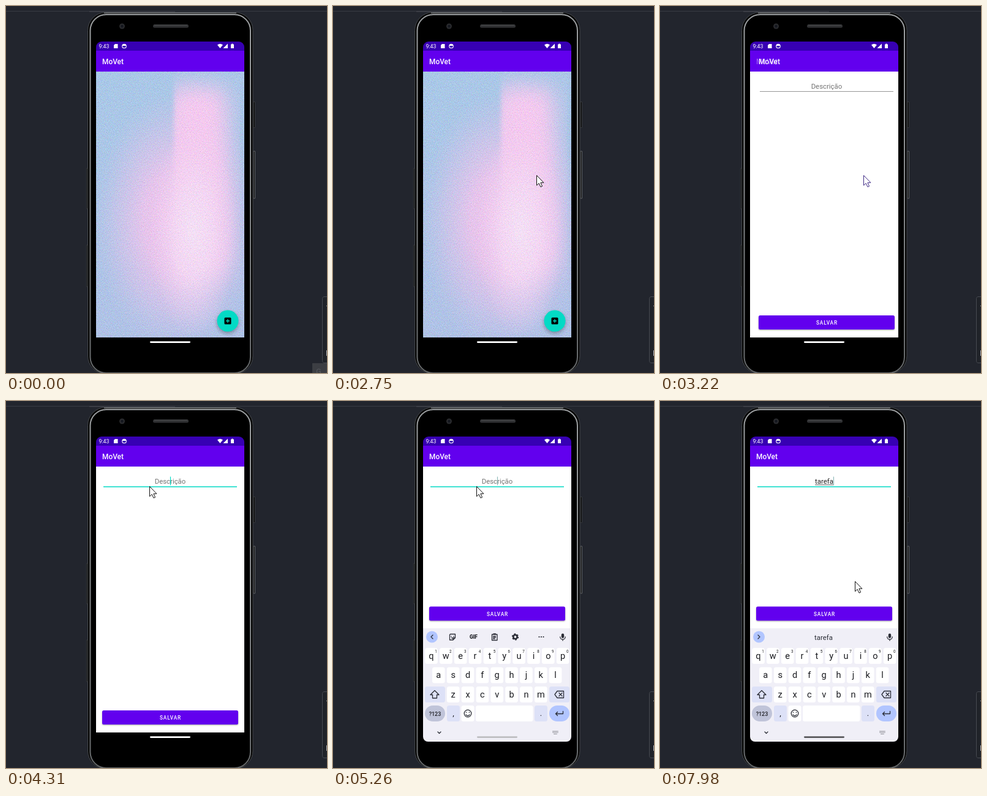
An HTML page for the animation above (8 s loop, 524 by 599 pixels).

```html
<!DOCTYPE html>
<html lang="pt">
<head>
<meta charset="utf-8">
<title>Notas</title>
<style>
html, body { margin: 0; width: 100%; height: 100%; overflow: hidden; background: #22252d; }
svg { display: block; width: 524px; height: 599px; }
text { font-family: Roboto, sans-serif; white-space: pre; }
.mid { text-anchor: middle; }
.ink { fill: none; stroke: #2b2d36; stroke-width: 1.3; stroke-linecap: round; stroke-linejoin: round; }
</style>
</head>
<body>
<svg viewBox="0 0 524 599">
  <defs>
    <linearGradient id="sky" x2=".25" y2="1">
      <stop offset="0" stop-color="#a9c8e7"/><stop offset="1" stop-color="#b0c2e6"/>
    </linearGradient>
    <linearGradient id="rim" x2="0" y2="1">
      <stop offset="0" stop-color="#9da0a2"/><stop offset=".5" stop-color="#85888a"/><stop offset="1" stop-color="#65686a"/>
    </linearGradient>
    <radialGradient id="glow">
      <stop offset="0" stop-color="#f2c6ee"/><stop offset=".4" stop-color="#efc4ec" stop-opacity=".85"/>
      <stop offset=".7" stop-color="#e0c4eb" stop-opacity=".5"/>
      <stop offset="1" stop-color="#cfc4ea" stop-opacity="0"/>
    </radialGradient>
    <radialGradient id="pale">
      <stop offset="0" stop-color="#f4e0f6"/><stop offset=".45" stop-color="#f3dbf5" stop-opacity=".7"/>
      <stop offset="1" stop-color="#f1d0f0" stop-opacity="0"/>
    </radialGradient>
    <filter id="b1" x="-30%" y="-30%" width="160%" height="160%"><feGaussianBlur stdDeviation="1.3"/></filter>
    <filter id="b3" x="-20%" y="-20%" width="140%" height="140%"><feGaussianBlur stdDeviation="3"/></filter>
    <filter id="b17" x="-70%" y="-30%" width="240%" height="160%"><feGaussianBlur stdDeviation="17"/></filter>
    <filter id="grain" filterUnits="userSpaceOnUse" x="147" y="107" width="242" height="434" color-interpolation-filters="sRGB">
      <feTurbulence type="fractalNoise" baseFrequency=".8" numOctaves="2" seed="4"/>
      <feColorMatrix values="1 0 0 0 0 0 1 0 0 0 0 0 1 0 0 0 0 0 0 1"/>
      <feComposite in="SourceGraphic" operator="arithmetic" k2="1" k3=".34" k4="-.17"/>
      <feComposite in2="SourceGraphic" operator="in"/>
    </filter>
    <clipPath id="page"><path d="M147 107h242v434h-242z"/></clipPath>
    <clipPath id="half"><path d="M274 100h130v450h-130z"/></clipPath>
    <clipPath id="screen"><path d="M147 58h242v490a8 8 0 0 1-8 8h-226a8 8 0 0 1-8-8z"/></clipPath>
  </defs>

  <path fill="#22252d" d="M0 0h524v599H0z"/>
  <path fill="#383b43" d="M0 8h524v1H0z"/>
  <path fill="#4a4d54" d="M136 8.6h140v1H136z"/>
  <g fill="none" stroke="#484b52">
    <path fill="#202329" d="M526 474.500h-6a3 3 0 0 0-3.500 3v102a3 3 0 0 0 3.500 3h6"/>
    <path stroke="#b5b7bc" d="M523 489.500h1M523.500 562v9"/>
  </g>
  <g id="tip">
    <path fill="#3c3e43" d="M500 583h24v16h-24z"/>
    <text x="506" y="601" font-size="13" fill="#55575c">G</text>
  </g>

  <!-- phone -->
  <path fill="#0c0c0d" stroke="#36383b" d="M404 156.500h2.500v42H404zM131.500 265h3v66h-3zM131.500 390h3v68h-3z"/>
  <path fill="#111" stroke="#606367" d="M404 237h2.500v77H404z"/>
  <rect x="133.500" y="10.500" width="269.500" height="589.500" rx="29" fill="#060606" stroke="#44474a"/>
  <rect x="137.500" y="14" width="261.500" height="585" rx="26" stroke="url(#rim)" stroke-width="2"/>
  <path fill="none" stroke="#999c9e" stroke-width="1.200" d="M160 11.500h216"/>
  <circle cx="189.500" cy="33" r="4.500" fill="#292a2d"/>
  <circle cx="189.500" cy="33" r="2.200" fill="#14171e"/>
  <rect x="240" y="30" width="58" height="5.500" rx="2.500" fill="#303133"/>
  <path stroke="#48494b" d="M242 31.500h54"/>

  <!-- list page -->
  <g id="list" clip-path="url(#page)">
    <g filter="url(#grain)">
      <path fill="url(#sky)" d="M147 107h242v434h-242z"/>
      <ellipse cx="278" cy="352" rx="135" ry="212" fill="url(#glow)"/>
      <g filter="url(#b3)"><g clip-path="url(#half)">
        <rect x="262" y="130" width="100" height="310" rx="26" fill="#f4c9ef" filter="url(#b17)"/>
      </g></g>
      <ellipse cx="306" cy="368" rx="72" ry="170" fill="url(#pale)"/>
    </g>
    <circle id="shade" cx="362" cy="517" r="17.500" filter="url(#b3)"/>
    <circle cx="362" cy="514" r="17.500" fill="#03dac5"/>
    <circle id="ripple" cx="362" cy="514" r="17.500" fill="#fff"/>
    <rect x="356.500" y="508.500" width="11" height="11" rx="1.500"/>
    <path stroke="#03dac5" stroke-width="1.300" d="M359 514h6M362 511v6"/>
  </g>

  <!-- form page -->
  <g id="form">
    <path fill="#fff" d="M147 107h242v434h-242z"/>
    <g id="body">
      <text id="field" class="mid" x="268" y="135" font-size="11.400"></text>
      <path id="compose" stroke="#333" stroke-width=".8"/>
      <path id="line" d="M159 140h218"/>
      <path id="caret" stroke-width="1.200"/>
      <g id="save">
        <rect x="157" y="506.500" width="222" height="22.500" rx="2.500" opacity=".35" filter="url(#b1)"/>
        <rect x="157" y="505" width="222" height="23" rx="2.500" fill="#6200ee"/>
        <text class="mid" x="268.500" y="520" font-size="8.300" font-weight="500" letter-spacing=".85" fill="#fff">SALVAR</text>
      </g>
    </g>
  </g>

  <!-- bars -->
  <path fill="#3700b3" d="M147 73v-6a9 9 0 0 1 9-9h224a9 9 0 0 1 9 9v6z"/>
  <path fill="#6200ee" d="M147 73h242v34h-242z"/>
  <g fill="#fff">
    <text x="151.500" y="68.500" font-size="8.800">9:43</text>
    <path d="M178 62h4.500v7h-6.500v-5z"/>
    <path d="M345 63.500q4.500-3.500 9 0l-4.500 5.500zM362 61.500v7.500h-7.500zM367 62.500h1.500v-1h2v1h1.500v6.500h-5z"/>
    <circle cx="193" cy="65.500" r="3.300" fill="none" stroke="#fff" stroke-width="1.100"/>
    <path d="M190 63h6v2h-6z"/>
    <text id="ghost" x="157" y="95" font-size="11.900" font-weight="500">MoVet</text>
    <text id="title" y="95" font-size="11.900" font-weight="500">MoVet</text>
  </g>

  <g clip-path="url(#screen)"><g id="keys"></g></g>
  <rect id="pill" x="235" y="547.200" width="66" height="2.800" rx="1.400"/>

  <g id="mouse">
    <circle id="click" r="12" fill="#ffe000" opacity=".5"/>
    <path id="arrow" fill="#fff" d="M.5.5v16.300l3.700-3.500 2.800 6 2.600-1.200-2.700-5.800h5z"/>
  </g>
</svg>
<script>
const $ = id => document.getElementById(id);
const show = (id, on) => $(id).style.display = on ? '' : 'none';
const set = (id, name, value) => $(id).setAttribute(name, value);
const move = (id, x, y) => set(id, 'transform', `translate(${x} ${y})`);
const clamp = v => Math.max(0, Math.min(1, v));
const part = (t, a, b) => clamp((t - a) / (b - a));
const smooth = p => p * p * (3 - 2 * p);
const LOOP = 8000;

function buildKeys() {
  const box = (x, y, w, fill, r = 3.5) =>
    `<rect x="${x}" y="${y}" width="${w}" height="26" rx="${r}" fill="${fill}"/>`;
  const label = (s, x, y, size, extra = '') =>
    `<text class="mid" x="${x}" y="${y}" font-size="${size}" fill="#1c1d22" ${extra}>${s}</text>`;
  const ink = d => `<path class="ink" d="${d}"/>`;
  const rows = [['qwertyuiop', 160.5, 403], ['asdfghjkl', 172.3, 434.5], ['zxcvbnm', 196.2, 466]];
  let out = '<path fill="#f0eff7" d="M147 371h242v185h-242z"/>';
  rows.forEach(([chars, x0, y], row) => [...chars].forEach((c, i) => {
    const x = x0 + i * 23.85;
    out += box(x - 10.3, y, 20.6, '#fff') + label(c, x, y + 17.5, 14.6);
    if (!row) out += label((i + 1) % 10, x + 7.5, y + 7.5, 6.3);
  }));
  const soft = '#dde1f7', blue = '#b1c5ff';
  out += box(150, 466, 33, soft) + box(353, 466, 33, soft)
    + box(150, 497, 33, '#c0c4d9', 13) + box(186, 497, 21, soft)
    + box(209.5, 497, 21, '#fff') + box(233, 497, 93.5, '#fff')
    + box(329, 497, 21, soft) + box(353, 497, 33, blue, 13)
    + label('?123', 166.5, 513.5, 9, 'font-weight="500"')
    + label(',', 196.5, 514, 13) + label('.', 339.5, 514, 13)
    + ink('M166 472.500l7 7h-3.500v5.500h-7v-5.500h-3.500z')
    + ink('M362 479l4-5.500h10.500v11H366zM369 476.500l5 5M374 476.500l-5 5')
    + ink('M375.500 506.500v4H363.500M366.500 507.500l-3 3 3 3')
    + ink('M217 512q3 3.500 6 0M217.500 508v.6M222.500 508v.6')
    + '<circle class="ink" cx="220" cy="510" r="5.800"/>'
    + ink('M171 540l2.500 2.500 2.500-2.500')
    + '<path fill="none" stroke="#50525a" stroke-dasharray="1.200 .8" d="M358.500 539h9M358.500 541h9M360.500 543.500h5"/>'
    + `<circle cx="161.500" cy="385" r="9.500" fill="${blue}"/>`
    + '<path id="chev" class="ink"/>'
    + '<rect x="372.800" y="379.500" width="4.400" height="7.500" rx="2.200" fill="#2b2d36"/>'
    + ink('M370.800 385a4.200 4.200 0 0 0 8.400 0M375 389.500v1.500')
    + '<g id="tools">'
    + ink('M191.500 380.500h8v6l-3.500 3.500h-5.500v-8.500zM199.500 386.500h-3.500v3.500M193 384v.5M197 384v.5M193.500 386.500q1 1 2 0')
    + label('GIF', 229.5, 388, 8.4, 'font-weight="900"')
    + ink('M259.500 381h8.500v9.500h-8.500zM262 380h3.500M261.500 384h4M261.500 386h4M261.500 388h2.500')
    + '<circle class="ink" cx="297.500" cy="385" r="3.200" style="stroke-width:2.600"/>'
    + '<circle class="ink" cx="297.500" cy="385" r="4.900" style="stroke-width:1.500;stroke-linecap:butt" stroke-dasharray="2.600 2.530"/>'
    + [336.5, 340, 343.5].map(x => `<circle cx="${x}" cy="385" r="1.100" fill="#2b2d36"/>`).join('')
    + '</g><g id="words">'
    + ['left', 'main', 'right'].map((id, i) =>
      `<text id="${id}" class="mid" x="${207 + i * 60}" y="389.500" font-size="11.400" fill="#2b2d36"></text>`).join('')
    + '</g>';
  $('keys').innerHTML = out;
}

// pointer stops: time, x, y
const path = [
  [70, 495, 590], [320, 452, 408], [520, 452, 408], [1150, 358, 508],
  [1690, 358, 508], [2490, 332, 276], [3640, 332, 276], [3900, 234, 139],
  [7300, 234, 139], [7840, 327, 260], [7980, 318, 294]
];
// typing: time, left and right suggestion
const typing = [
  [6300, 'te', 'tem'], [6440, 'tá', 'tal'], [6710, 'tar', 'tarde'],
  [6900, 'tare', 'tarefa'], [7100, 'taref', 'tarefa'], [7240, '', '']
];

function pointer(t) {
  const i = path.findIndex(k => k[0] > t);
  if (i < 0) return path[path.length - 1].slice(1);
  if (!i) return path[0].slice(1);
  const [a, x, y] = path[i - 1], [b, u, v] = path[i];
  const p = smooth(part(t, a, b));
  return [x + (u - x) * p, y + (v - y) * p];
}

function drawForm(t) {
  const on = t >= 3150, focus = t >= 4240;
  const shift = on && t < 3500 ? 12 * Math.exp((3150 - t) / 64) : 0;
  show('form', on);
  show('list', t < 3300);
  set('form', 'opacity', 0.5 + 0.5 * part(t, 3150, 3215));
  move('body', shift, 0);
  set('title', 'x', 157 + shift);
  set('ghost', 'opacity', on ? 0.4 * (1 - part(t, 3200, 3350)) : 0);

  const count = typing.filter(k => t >= k[0]).length;
  const word = 'tarefa'.slice(0, count);
  const field = $('field');
  field.textContent = word || 'Descrição';
  set('field', 'fill', count ? '#222' : '#737373');
  set('line', 'stroke', focus ? '#03dac5' : '#8c8c8c');
  set('line', 'stroke-width', focus ? 1.6 : 0.9);
  set('line', 'transform', focus ? '' : 'translate(0 -.5)');

  const half = count ? field.getComputedTextLength() / 2 : 0;
  set('compose', 'd', count ? `M${268 - half} 136.800h${2 * half}` : '');
  set('caret', 'd', `M${268.5 + half} 123.500v14`);
  set('caret', 'stroke', t < 4740 ? '#03dac5' : '#8fb9b8');
  const blink = Math.floor((t - 4240) / 500) % 2 === 0;
  show('caret', focus && (count > 0 || blink));

  show('tools', !count);
  show('words', count);
  set('chev', 'd', count ? 'M160 382l3 3-3 3' : 'M163 382l-3 3 3 3');
  $('main').textContent = word;
  $('left').textContent = count ? typing[count - 1][1] : '';
  $('right').textContent = count ? typing[count - 1][2] : '';
}

function drawKeys(t) {
  const p = part(t, 4700, 5050);
  show('keys', t >= 4700);
  move('keys', 0, 185 * (1 - p) ** 2.5);
  move('save', 0, t >= 4780 ? -169.5 : 0);
  const g = Math.round(255 - 65 * part(t, 5080, 5260) - 100 * part(t, 5440, 6570));
  set('pill', 'fill', `rgb(${g},${g},${Math.min(255, g + 3)})`);
}

function draw(t) {
  show('tip', t < 70);
  const press = smooth(part(t, 1620, 1760)) * (1 - smooth(part(t, 2300, 2750)));
  set('ripple', 'opacity', 0.24 * press);
  set('shade', 'opacity', 0.3 + 0.1 * press);
  move('shade', 0, 2.5 * press);
  drawForm(t);
  drawKeys(t);
  const [x, y] = pointer(t);
  show('mouse', t >= 70);
  move('mouse', x, y);
  show('click', (t >= 1550 && t < 1690) || (t >= 4100 && t < 4240));
  set('arrow', 'stroke', t >= 3150 && t < 3290 ? '#3f2a86' : '#111');
}

buildKeys();
const start = performance.now();
function tick() {
  draw((performance.now() - start) % LOOP);
  requestAnimationFrame(tick);
}
tick();
</script>
</body>
</html>
```
